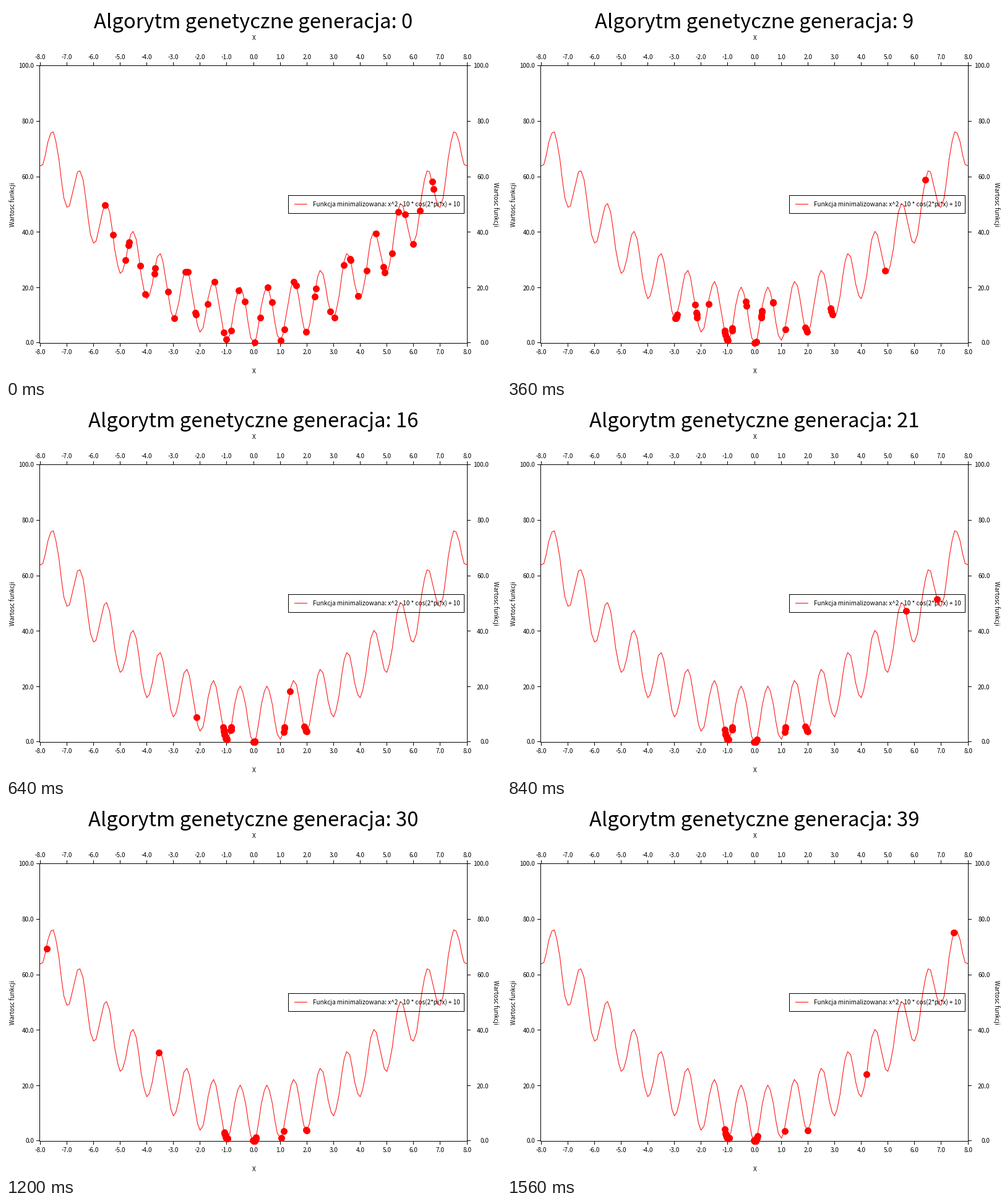
Write a matplotlib script that moves like this. It is 800 by 600 pixels and loops after 1.6 s.

```python
import matplotlib.pyplot as plt
import numpy as np
from matplotlib.animation import FuncAnimation

W, H, DPI = 800, 600, 100
PX = 72 / DPI                                # points per pixel
GENERATIONS, INTERVAL = 40, 40
SIZE, MUTANTS, TURNOVER = 50, 2, 4           # individuals per generation
LEFT, TOP, RIGHT, BOTTOM = 54, 96, 745, 545  # frame lines, in pixels
RED = "#ff0000"

plt.rcParams["font.family"] = ["Noto Sans CJK JP", "DejaVu Sans"]


def cost(x):
    return x ** 2 - 10 * np.cos(2 * np.pi * x) + 10


def to_px(x):
    return LEFT + 1 + np.floor((x + 8) / 16 * 690 + 1e-3) + 0.5


def to_py(y):
    return BOTTOM - 1 - np.floor(y / 100 * 448 + 1e-3) + 0.5


def evolve(seed=4):
    """Survivors stay put; the rest become children of the better ones."""
    rng = np.random.default_rng(seed)
    pop = np.linspace(-5.5, 6.75, SIZE) + rng.normal(0, 0.12, SIZE)
    history = [pop]
    for gen in range(1, GENERATIONS):
        limit = 4.2 + 50 * np.exp(-gen / 6)
        alive = rng.permutation(pop[cost(pop) <= limit])
        alive = alive[:SIZE - MUTANTS - TURNOVER]
        a, b = rng.choice(alive, (2, SIZE - MUTANTS - len(alive)))
        children = np.where(cost(a) < cost(b), a, b)
        children += rng.normal(0, 0.02, len(children))
        mutants = rng.uniform(-7.8, 7.7, MUTANTS)
        pop = np.concatenate([alive, children, mutants])
        history.append(pop)
    return history


fig = plt.figure(figsize=(W / DPI, H / DPI), dpi=DPI, facecolor="white")
ax = fig.add_axes([0, 0, 1, 1])
ax.set_xlim(0, W)
ax.set_ylim(H, 0)
ax.axis("off")


def line(xs, ys, color="black", z=2):
    ax.plot(xs, ys, color=color, lw=PX, zorder=z, snap=False,
            solid_joinstyle="miter", solid_capstyle="projecting")


def label(x, y, text, ha="center", va="baseline", size=10, **kw):
    return ax.text(x, y, text, ha=ha, va=va, fontsize=size * PX,
                   color="black", zorder=3, **kw)


def box(x0, y0, x1, y1, z):
    line(np.array([x0, x1, x1, x0, x0]) + 0.5,
         np.array([y0, y0, y1, y1, y0]) + 0.5, z=z)


# frame, ticks and tick labels
box(LEFT, TOP, RIGHT, BOTTOM, 2)
for v in range(-8, 9):
    x = to_px(v)
    for edge, end in ((TOP, TOP - 5), (BOTTOM, BOTTOM + 5)):
        line([x, x], [edge + 0.5, end + 0.5])
    label(x, 86, f"{v:.1f}")
    label(x, 563, f"{v:.1f}")
for v in range(0, 101, 20):
    y = to_py(v)
    for edge, end in ((LEFT, LEFT - 5), (RIGHT, RIGHT + 5)):
        line([edge + 0.5, end + 0.5], [y, y])
    label(45, y + 4, f"{v:.1f}", ha="right")
    label(780.5, y + 4, f"{v:.1f}", ha="right")

# axis descriptions
for y in (55, 594):
    label(401, y, "X")
for x, angle in ((10.5, 90), (791.5, 270)):
    label(x, 321, "Wartosc funkcji", va="center", rotation=angle)

# curve
xs = np.linspace(-8, 8, 161)
line(to_px(xs), to_py(cost(xs)), RED)

# legend
box(456, 306, 740, 335, 3)
line([466.5, 486.5], [320.5, 320.5], RED, 3)
label(496, 324, "Funkcja minimalizowana: x^2 - 10 * cos(2*pi*x) + 10", ha="left")

title = label(400, 36, "", size=32.8)
dots, = ax.plot([], [], "o", color=RED, ms=11 * PX, mew=0, zorder=4, snap=False)
history = evolve()


def update(gen):
    x = history[gen]
    dots.set_data(to_px(x), to_py(cost(x)))
    title.set_text(f"Algorytm genetyczne generacja: {gen}")
    return dots, title


anim = FuncAnimation(fig, update, frames=GENERATIONS, interval=INTERVAL,
                     repeat=True, repeat_delay=0)
plt.show()
```
